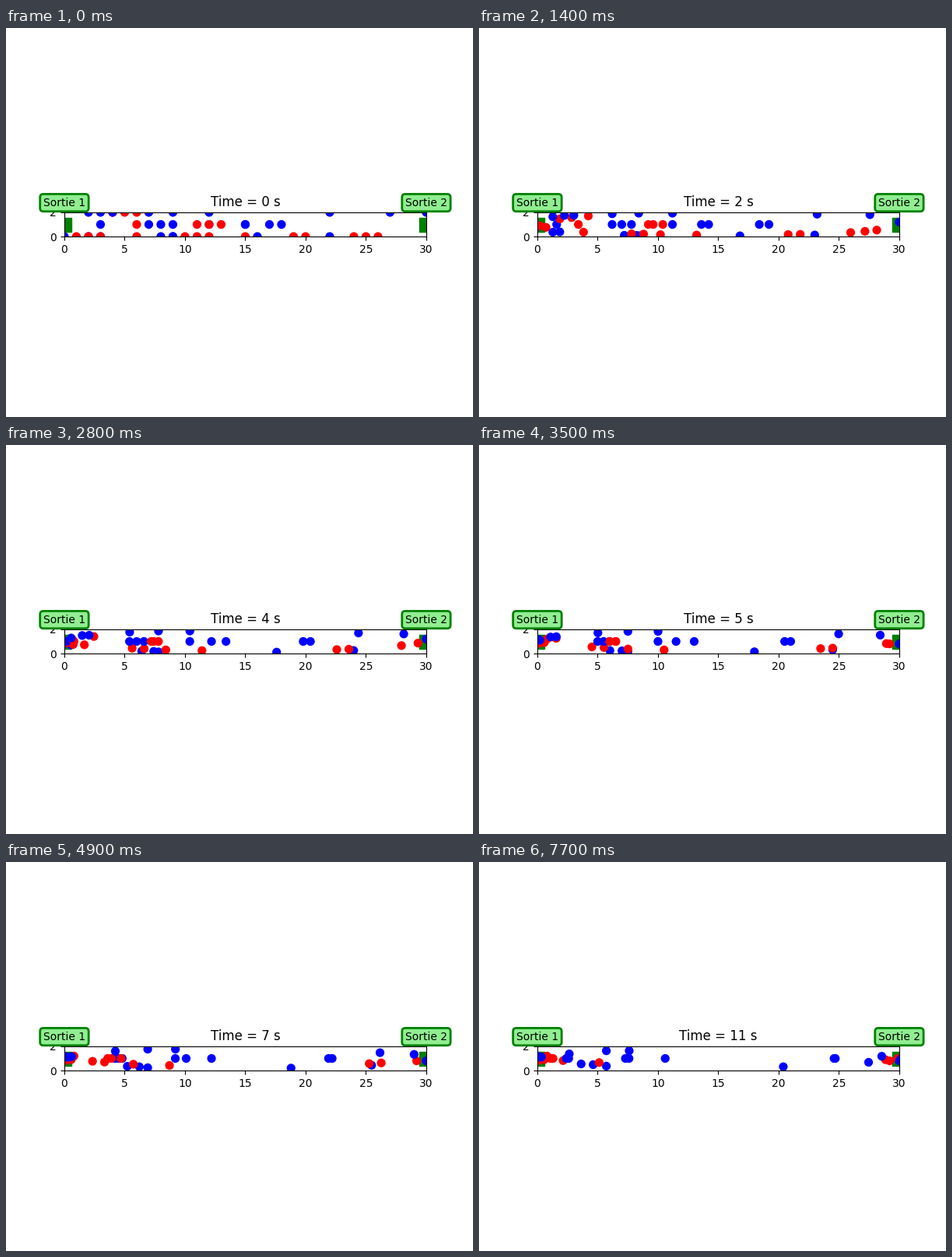
A matplotlib script for the animation above (8000 ms loop, 600 px wide and 500 px high).

```python
import numpy as np
import matplotlib.pyplot as plt
from matplotlib.animation import FuncAnimation

LENGTH, WIDTH = 30, 2
TICK_MS, STEP_MS, LOOP_MS = 100, 700, 8000

# Slowest pace of each colour, then who starts on rows 0, 1 and 2;
# every further group walks 0.1 faster.
SLOWEST = {"blue": 0.3, "red": 0.9}
STARTS = {
    "blue": [
        ([9], [], [9, 27]),
        ([0, 2, 8, 9, 16], [7, 12, 15], [2, 3, 7, 12, 30]),
        ([22], [8], [4]),
        ([3], [9, 18], [22]),
        ([], [3, 15, 17], []),
    ],
    "red": [
        ([12, 15, 19, 20], [11], [6]),
        ([2, 24], [], []),
        ([6, 10, 11, 25, 26], [], [4, 5]),
        ([1, 3], [12], []),
        ([], [6, 13], []),
    ],
}


def crowd():
    """Yield (colour, x, y, speed) from back to front."""
    for row in range(WIDTH + 1):
        for color in ("blue", "red") if row < WIDTH else ("red", "blue"):
            for k, rows in enumerate(STARTS[color]):
                for x in rows[row]:
                    yield color, x, row, SLOWEST[color] + 0.1 * k


colors, xs, ys, speed = zip(*crowd())
start, speed = np.column_stack([xs, ys]), np.array(speed)

# Everyone heads for the nearest exit.
goal = np.array([(LENGTH if x > LENGTH / 2 else 0, WIDTH / 2) for x in xs])
dist = np.hypot(*(start - goal).T)
approach = np.ceil(dist / speed - 1e-9) - 1


def positions(t):
    """Walk straight to the exit, then step back and forth across it."""
    left = dist - speed * np.minimum(t, approach)
    past = (t > approach) & ((t - approach) % 2 == 1)
    left = left - speed * past
    return goal + (start - goal) * (left / dist)[:, None]


fig, ax = plt.subplots(figsize=(6, 5), dpi=100)
fig.subplots_adjust(left=0.1249, right=0.8999)
ax.set_xlim(0, LENGTH)
ax.set_ylim(0, WIDTH)
ax.set_aspect("equal")
ax.set_xticks(range(0, LENGTH + 1, 5))
ax.set_yticks([0, WIDTH])

for i, x in enumerate((0, LENGTH), 1):
    ax.scatter(x, WIDTH / 2, s=150, marker="s", color="green")
    ax.text(x, 2.8, f"Sortie {i}", ha="center", va="center", fontsize=10,
            bbox=dict(boxstyle="round", fc="lightgreen", ec="green", lw=2))

dots = ax.scatter(xs, ys, s=50, c=colors)
title = ax.set_title("Time = 0 s")


def update(frame):
    t = frame * TICK_MS // STEP_MS
    dots.set_offsets(positions(t))
    title.set_text(f"Time = {t} s")
    return dots, title


anim = FuncAnimation(fig, update, frames=LOOP_MS // TICK_MS, interval=TICK_MS,
                     repeat=True, repeat_delay=0)
plt.show()
```
